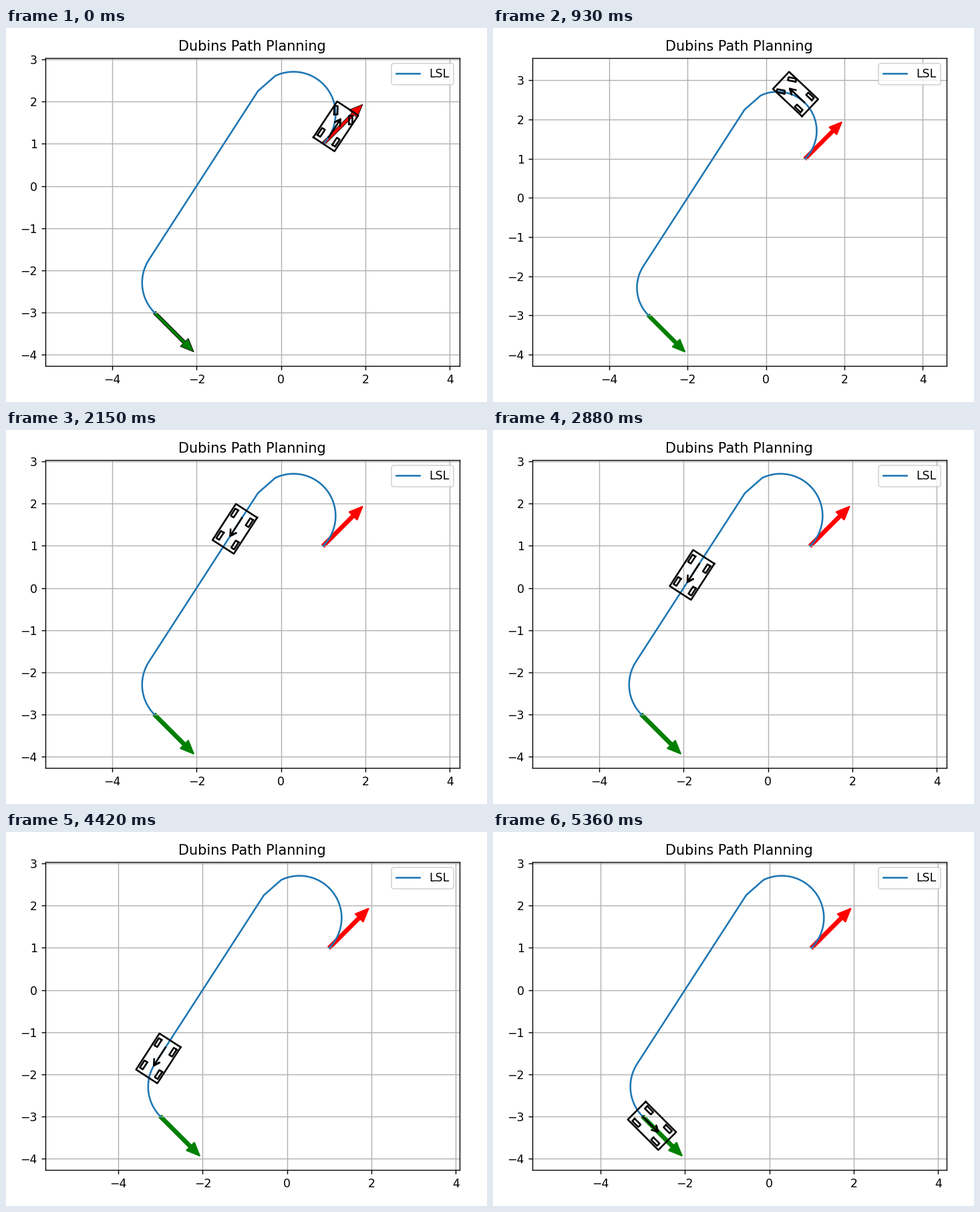
Write a matplotlib script that moves like this. It is 720 by 560 pixels and loops after 6420 ms.

```python
import numpy as np
import matplotlib.pyplot as plt
from matplotlib.animation import FuncAnimation
from matplotlib.ticker import MultipleLocator

W, H, DPI = 720, 560, 125
LOOP_MS, TICK_MS = 6420, 20
LEFT, BOTTOM, AX_W, AX_H = 58.8, 54, 620, 461.4

START = (1.0, 1.0, np.pi / 4)
GOAL = (-3.0, -3.0, -np.pi / 4)
STEP = 0.1

# Car geometry, measured from the rear axle
FRONT, REAR, HALF_W = 0.82, 0.20, 0.30
WHEEL_BASE, HALF_TREAD = 0.63, 0.21
WHEEL_L, WHEEL_W = 0.10, 0.04
HEADING_LEN = 0.51

# Moments at which the car advances, and its path index at some of them
MOVES = np.array([
    0, 70, 140, 340, 470, 600, 800, 930, 1000, 1130, 1200,
    1330, 1460, 1610, 1680, 1810, 1880, 2080, 2150, 2280, 2350,
    2550, 2680, 2750, 2880, 2950, 3080, 3210, 3280, 3430, 3610,
    3810, 3890, 4090, 4220, 4290, 4420, 4490, 4620, 4690, 4760,
    4960, 5090, 5360])
KEY_MOVES = [0, 7, 11, 18, 30, 36, 40, 42, 43]
KEY_INDEX = [2, 16, 23, 36, 61, 72, 81, 88, 91]
OUTLINE_END = 340


def left_center(x, y, yaw):
    return np.array([x - np.sin(yaw), y + np.cos(yaw)])


def lsl_path():
    """Return rows of x, y, yaw, steer for left turn, straight, left turn."""
    c1, c2 = left_center(*START), left_center(*GOAL)
    dx, dy = c2 - c1
    line_yaw = np.arctan2(dy, dx)
    line_len = np.hypot(dx, dy)
    turn1 = (line_yaw - START[2]) % (2 * np.pi)
    turn2 = (GOAL[2] - line_yaw) % (2 * np.pi)
    steer = np.arctan(WHEEL_BASE)

    def on_arc(center, yaw, angle):
        return (center[0] + np.sin(yaw), center[1] - np.cos(yaw), yaw, angle)

    rows = [on_arc(c1, START[2] + STEP * k, steer) for k in range(29)]
    rows.append(on_arc(c1, START[2] + turn1, 0))
    x0, y0 = rows[-1][:2]
    dists = np.append(np.arange(STEP, line_len, STEP), line_len)
    rows += [(x0 + d * np.cos(line_yaw), y0 + d * np.sin(line_yaw),
              line_yaw, 0) for d in dists]
    rows += [on_arc(c2, line_yaw + a, steer)
             for a in np.arange(STEP, turn2, STEP)]
    rows.append(on_arc(c2, line_yaw + turn2, 0))
    return np.array(rows)


def place(pts, x, y, yaw):
    c, s = np.cos(yaw), np.sin(yaw)
    return pts @ np.array([[c, s], [-s, c]]) + [x, y]


def box(x0, x1, half):
    return np.array([[x0, half], [x0, -half], [x1, -half], [x1, half],
                     [x0, half]])


BODY = box(-REAR, FRONT, HALF_W)
WHEEL = box(-WHEEL_L, WHEEL_L, WHEEL_W)
BARB = 0.3 * HEADING_LEN * np.array([-np.cos(np.pi / 6), np.sin(np.pi / 6)])
TIP = np.array([HEADING_LEN, 0])
HEADING = np.array([[0, 0], TIP, TIP + BARB, TIP, TIP + BARB * [1, -1]])


def car_parts(x, y, yaw, steer):
    parts = [BODY, HEADING]
    for side in (HALF_TREAD, -HALF_TREAD):
        parts.append(place(WHEEL, 0, side, 0))
        parts.append(place(WHEEL, WHEEL_BASE, side, steer))
    return [place(p, x, y, yaw) for p in parts]


def add_arrow(x, y, yaw, color):
    return ax.arrow(x, y, np.cos(yaw), np.sin(yaw), width=0.08,
                    head_width=0.27, head_length=0.32, fc=color, ec=color)


path = lsl_path()

fig = plt.figure(figsize=(W / DPI, H / DPI), dpi=DPI, facecolor="white")
ax = fig.add_axes([LEFT / W, BOTTOM / H, AX_W / W, AX_H / H])
ax.plot(path[:, 0], path[:, 1], color="tab:blue", label="LSL")
arrows = [add_arrow(*START, "red"), add_arrow(*GOAL, "green")]
car = [ax.plot([], [], color="black")[0] for _ in range(6)]
ax.set_title("Dubins Path Planning")
ax.legend(loc="upper right")
ax.grid(True)
ax.xaxis.set_major_locator(MultipleLocator(2))
ax.yaxis.set_major_locator(MultipleLocator(1))

scene = np.vstack([path[:, :2]] + [a.get_xy() for a in arrows])


def fit_view(pts):
    """Pad the data by 5 % in y and keep equal units on both axes."""
    (x0, y0), (x1, y1) = pts.min(axis=0), pts.max(axis=0)
    pad = 0.05 * (y1 - y0)
    half = (y1 - y0 + 2 * pad) * AX_W / AX_H / 2
    mid = (x0 + x1) / 2
    ax.set_xlim(mid - half, mid + half)
    ax.set_ylim(y0 - pad, y1 + pad)


def update(i):
    t = i * TICK_MS + TICK_MS / 2
    move = np.searchsorted(MOVES, t, side="right") - 1
    index = int(np.interp(move, KEY_MOVES, KEY_INDEX) + 0.5)
    parts = car_parts(*path[min(index, len(path) - 1)])
    for line, pts in zip(car, parts):
        line.set_data(pts[:, 0], pts[:, 1])
    for arrow in arrows:
        outlined = t < OUTLINE_END
        arrow.set_edgecolor("black" if outlined else arrow.get_facecolor())
        arrow.set_linewidth(0.5 if outlined else 1.0)
    fit_view(np.vstack([scene] + parts))
    return car + arrows


anim = FuncAnimation(fig, update, frames=LOOP_MS // TICK_MS,
                     interval=TICK_MS, repeat=True, repeat_delay=0,
                     blit=False)
plt.show()
```
